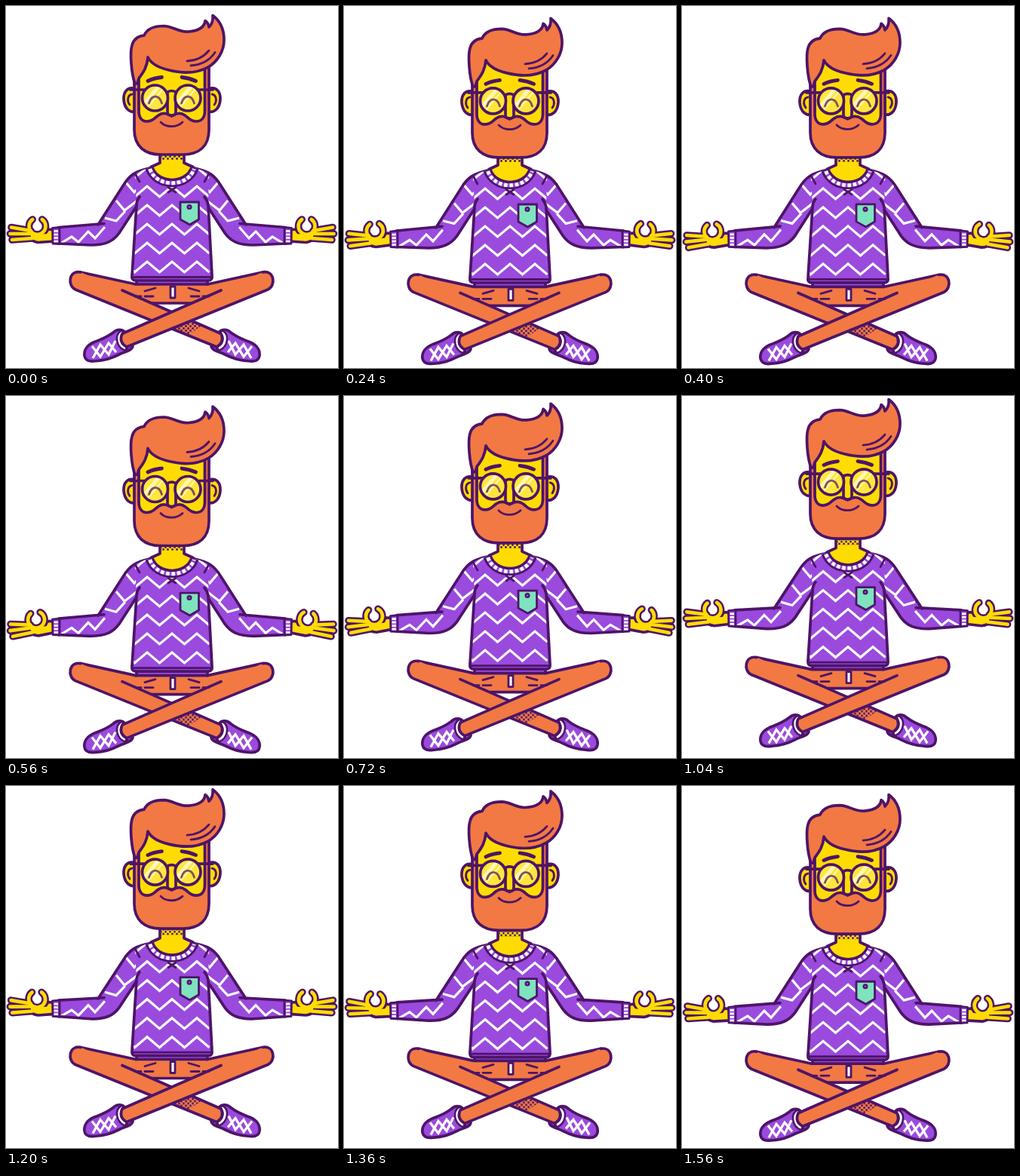
Recreate the animation shown at these times as an HTML page. Size 440 by 480 pixels, loop 1.6 s.

```html
<!DOCTYPE html>
<html lang="en">
<head>
<meta charset="utf-8">
<title>Meditating man</title>
<style>
  html, body { margin: 0; width: 100%; height: 100%; overflow: hidden; background: #fff; }
  svg { display: block; width: 440px; height: 480px; }
  .o { fill: #f27943; } .p { fill: #9a4add; } .y { fill: #ffdc00; } .m { fill: #7ee3be; } .w { fill: #fff; }
  .n { fill: none; }
  .s { stroke: #4d1468; stroke-width: 3.7; stroke-linejoin: round; stroke-linecap: round; }
  .t { stroke-width: 2.8; }
  .z { fill: none; stroke: #fff; stroke-width: 3.2; stroke-linejoin: miter; }
  .ink { fill: none; stroke: #4d1468; stroke-width: 9.6; stroke-linecap: round; }
  .skin { fill: none; stroke: #ffdc00; stroke-width: 4.6; stroke-linecap: round; }
</style>
</head>
<body>
<svg viewBox="0 0 440 480" xmlns="http://www.w3.org/2000/svg">
  <defs>
    <pattern id="dots" width="6" height="6" patternUnits="userSpaceOnUse">
      <circle cx="1.5" cy="1.5" r="1.45" fill="#4d1468"/>
      <circle cx="4.5" cy="4.5" r="1.45" fill="#4d1468"/>
    </pattern>
    <path id="torsoShape" d="M192 214C183 217 176 219 171 223L173 262L167 357Q166 364 172 364H268Q274 364 273 357L268 262L269 223C264 219 257 217 248 214Z"/>
    <path id="armShape" d="M190 215C172 219 164 224 156 237L123 289L68 294V315L112 317C132 317 142 312 150 301L174 264V222Z"/>
    <clipPath id="torsoClip"><use href="#torsoShape"/></clipPath>
    <clipPath id="armClip"><use href="#armShape"/></clipPath>
    <clipPath id="lensL"><circle cx="197.500" cy="122" r="17"/></clipPath>
    <clipPath id="lensR"><circle cx="241" cy="122" r="17"/></clipPath>

    <g id="fingers">
      <path d="M33 298L7 293.500M33 302H5.500M35 308L8 310"/>
      <path d="M35.200 283A11 11 0 1 0 47.800 283"/>
    </g>
    <g id="shoe">
      <path class="p s" d="M158 433C154 428 147 428 142 433C133 440 126 442 116 446C107 450 103 457 104 464C105 469 109 471.500 116 471C132 470 140 467 150 462C158 458 167 457 168 451Z"/>
      <path class="n s" style="stroke-width:8" d="M154 433C147 437 149 450 158 454"/>
      <path class="n" stroke="#fff" stroke-width="3" d="M154 433C147 437 149 450 158 454"/>
      <path class="z" d="M114 451L125 465L136 447L146 459M115 467L125 449L136 462L145 444"/>
    </g>
  </defs>

  <g id="legs">
    <use href="#shoe"/><use href="#shoe" transform="matrix(-1 0 0 1 440 0)"/>
    <path class="o" d="M99 353C83 350 81 371 92 376L193 394H246L347 376C358 371 356 350 340 353L273 367H168Z"/>
    <path class="p s" d="M173 350H267V369H173Z"/>
    <path class="n s" d="M99 353L172 369M340 353L267 369M193 394H246"/>
    <path class="o s" d="M154 377L285 434.500Q290 446 279 452L92 376C81 371 83 350 99 353"/>
    <path fill="url(#dots)" d="M222 428L246 417L259 424L242 436Z"/>
    <path class="o s" d="M285 377L154 434.500Q149 446 160 452L347 376C358 371 356 350 340 353"/>
    <path class="n s t" d="M184 378L198 374M256 378L242 374M171 385H179M184 385H195M245 385H256M261 385H269"/>
    <rect class="w s t" x="218" y="372" width="6" height="15"/>
  </g>

  <g id="arm">
    <use href="#armShape" class="p"/>
    <path class="z" clip-path="url(#armClip)" d="M158 233L170 247L184 233M146 258L157 271L174 258M131 281L146 285L158 272M72 315L87 306L96 313L109 299L118 308L131 293"/>
    <path class="n s" d="M190 215C172 219 164 224 156 237L122 290M130 288.500L70 293.500M70 315L112 317C132 317 142 312 150 301L174 264"/>
    <g id="hand">
      <use href="#fingers" class="ink"/>
      <path class="y s" d="M31 300.500H53L56 296L64 297V312L42 313.500Q33 312 31 306Z"/>
      <use href="#fingers" class="skin"/>
    </g>
    <path class="p s t" d="M61.500 294.500L71 293.500V315.500L62 315Z"/>
    <path class="z" style="stroke-width:2.600" d="M63.500 298.500H69M63.500 303H69M63.500 307.500H69M63.500 312H69"/>
  </g>
  <use href="#arm" transform="matrix(-1 0 0 1 440 0)"/>

  <g id="body">
    <use href="#torsoShape" class="p"/>
    <path id="zigs" class="z" clip-path="url(#torsoClip)"/>
    <path class="n s" d="M177 253Q173 258 173 264L167 357Q166 364 172 364H268Q274 364 273 357L268 264Q267 258 263 253"/>
    <path class="n s t" d="M169 359.500H271M171 222L177 233M269 222L263 233"/>
    <path class="y s" d="M204 186V208L192 213.500C200 237 240 237 248 213.500L236 208V186"/>
    <path fill="url(#dots)" d="M206 186H234V204H206Z"/>
    <path class="n s" style="stroke-width:11.500;stroke-linecap:butt" d="M190 214.500C199 241 241 241 250 214.500"/>
    <path class="n" stroke="#9a4add" stroke-width="5" d="M190.700 216C199 241 241 241 249.300 216"/>
    <path class="n" stroke="#fff" stroke-width="5" stroke-dasharray="4.500 2.800" d="M190.700 216C199 241 241 241 249.300 216"/>
    <path class="n s t" d="M215 240.500L225 247M225 240.500L215 247"/>
    <path class="m s t" d="M231 260H255.500V283L243.500 290L231 283Z"/>
    <circle class="p s" style="stroke-width:2.200" cx="243" cy="266.500" r="2.400"/>
  </g>

  <g id="head">
    <g id="ear">
      <path class="y s" d="M172 110C161 106 155.500 114 156 124C157 136 164 142 172 140"/>
      <path class="n s t" d="M167 117C161 118 160 126 164 131"/>
    </g>
    <use href="#ear" transform="matrix(-1 0 0 1 440 0)"/>
    <path class="o s" d="M170 70V164C170 186 184 197 205 197H234C256 197 269 186 269 164V70Z"/>
    <path class="y s" d="M176 62V139C176 149 181 153 187 153C195 153 197 148 202 145C207 141 214 142 219.500 146C225 142 232 141 237 145C242 148 244 153 252 153C258 153 263.500 149 263.500 139V62Z"/>
    <path class="y s" d="M214 115V141Q214 145 219.500 145Q225 145 225 141V115"/>
    <path class="n s t" d="M205 154C212 161.500 226 161.500 234 154"/>
    <path class="n s" style="stroke-width:4.800" d="M188 99.500Q196 95.500 206.500 94.500M251.500 99.500Q243 95.500 233 94.500"/>

    <g fill="#ffe63c">
      <circle cx="197.500" cy="122" r="17"/><circle cx="241" cy="122" r="17"/>
    </g>
    <g stroke="#fff7b8" stroke-width="5">
      <path clip-path="url(#lensL)" d="M182 131L208 100"/>
      <path clip-path="url(#lensL)" stroke-width="2" d="M188 134L214 103"/>
      <path clip-path="url(#lensR)" d="M225 131L251 100"/>
      <path clip-path="url(#lensR)" stroke-width="2" d="M231 134L257 103"/>
    </g>
    <path class="n s t" opacity=".72" d="M189.500 129C193 117 203 117 206.500 129M232.500 129C236 117 246 117 249.500 129"/>
    <g class="n s">
      <circle cx="197.500" cy="122" r="17"/><circle cx="241" cy="122" r="17"/>
      <path d="M165 111H184M274 111H255M214 114Q219.500 111 225 114"/>
    </g>

    <path class="o s" d="M171 103C166 90 164 62 167 52C169 44 175 40 183 39C187 30 197 26.500 209 26.500C222 27 228 35 242 34C254 33 263 29 264 19.500Q268 22 269 28Q275 22 274 12.500C284 20 289 31 289 45C289 60 280 74 268 81C252 90 232 89 216 85C203 82 192 76 188 68C187 82 181 89 176 96L174 103Z"/>
    <path class="n s t" d="M240 73C252 72.500 262 67.500 269 59M245 79C259 78 270 72 277 61.500"/>
  </g>
</svg>
<script>
  const LOOP = 1600, STEP = 40;
  const $ = id => document.getElementById(id);
  const wave = (t, peak) => Math.cos(2 * Math.PI * (t - peak) / LOOP);
  // Vertical travel measured from the pose at time zero.
  const lift = (t, amp, peak) => amp * (wave(t, peak) - wave(0, peak));
  const move = (id, y) => $(id).setAttribute('transform', `translate(0 ${y.toFixed(3)})`);

  // Knitted rows: peaks fall at x = 187, 220 and 253.
  let zigs = '';
  for (let y = 214; y < 350; y += 25) {
    for (let i = 0; i <= 7; i++)
      zigs += `${i ? 'L' : 'M'}${154 + i * 16.5} ${y + (i % 2 ? 14 : 0)}`;
  }
  $('zigs').setAttribute('d', zigs);

  function draw(t) {
    const body = lift(t, 4.9, 310), cuff = lift(t, 7.4, 310);
    move('head', lift(t, 6.2, 315));
    move('body', body);
    move('legs', lift(t, 5.2, 325));

    // The sleeve shears so that it follows both shoulder and wrist.
    const shoulderX = 185, slope = (body - cuff) / (shoulderX - 66);
    $('arm').setAttribute('transform', `matrix(1 ${slope} 0 1 0 ${body - slope * shoulderX})`);
    const turn = -4 * (wave(t, 680) - wave(0, 680));
    $('hand').setAttribute('transform', `rotate(${turn} 64 305)`);
  }

  function tick() {
    const t = performance.now() % LOOP;
    draw(Math.floor(t / STEP) * STEP);
    requestAnimationFrame(tick);
  }
  tick();
</script>
</body>
</html>
```
